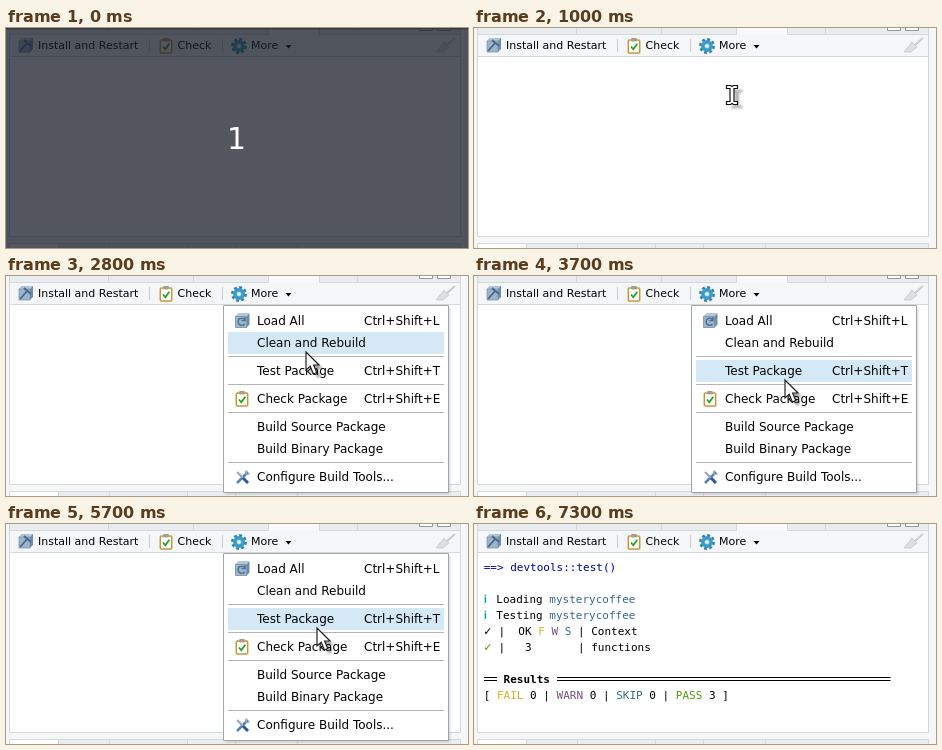
Recreate the animation shown at these times as an HTML page. Size 462x220 px, loop 8 s.

```html
<!DOCTYPE html>
<html lang="en">
<head>
<meta charset="utf-8">
<title>Build menu</title>
<style>
html, body { margin: 0; width: 100%; height: 100%; overflow: hidden; background: #f4f6f8; }
svg { display: block; width: 462px; height: 220px; }
text { white-space: pre; font: 11px "DejaVu Sans", sans-serif; }
#menu text { font-size: 12px; }
#output text { font-family: "DejaVu Sans Mono", monospace; }
#output .tick { font-family: "DejaVu Sans", sans-serif; }
#output .bold { font-weight: bold; }
#countdown text { font-size: 30px; fill: #fff; text-anchor: middle; }
.info { fill: #06989a; font-weight: bold; }
.pkg, .skip { fill: #37698f; }
.fail { fill: #e0b01c; }
.warn { fill: #75507b; }
.pass { fill: #4e9a06; }
</style>
</head>
<body>
<svg viewBox="0 0 462 220">
  <defs>
    <filter id="soft" x="-50%" y="-50%" width="200%" height="200%"><feGaussianBlur stdDeviation="1"/></filter>
    <g id="cube">
      <path d="M1 3 4 0H15V11L12 14H1Z" fill="#6f8ba8"/>
      <path d="M1 3 4 0H15L12 3Z" fill="#b4c6d8"/>
      <path d="M1 3H12V14H1Z" fill="#9db4ca" stroke="#7d97b1" stroke-width=".8"/>
    </g>
    <g id="clipboard">
      <rect x=".8" y="2" width="11.4" height="13" rx="1" fill="#fff" stroke="#c5973d" stroke-width="1.5"/>
      <rect x="3.5" y="0" width="6" height="3.5" rx="1" fill="#a9a08a"/>
      <path d="M3.5 8.5 5.8 11.3 9.8 5.8" fill="none" stroke="#23a32b" stroke-width="1.8"/>
    </g>
    <path id="arrowShape" d="M0 0V18L4.2 14.2 7.4 22 10.8 20.5 7.6 13H13Z"/>
    <path id="beamShape" d="M-5.5 -9.5H-1.5L0 -8.5 1.5 -9.5H5.5V-6.5H2V6.5H5.5V9.5H1.5L0 8.5 -1.5 9.5H-5.5V6.5H-2V-6.5H-5.5Z"/>
  </defs>

  <!-- Pane frame and neighbouring tabs -->
  <rect width="462" height="220" fill="#f4f6f8"/>
  <path d="M4 0H454V6H4Z" fill="#e9edf0"/>
  <path d="M263 0H313V7H263Z" fill="#f8f9fa"/>
  <path d="M4 6.5H263M313 6.5H454M102.5 0V6M187.5 0V6M262.5 0V6M313.5 0V6M351.5 0V6" stroke="#d3d8dc"/>
  <path d="M413.5 0V2.5H426.5V0M431.5 0V2.5H444.5V0" fill="#fff" stroke="#8e959c"/>
  <path d="M4 29H454V208H4Z" fill="#fff"/>
  <path d="M3.5 0V208.5H454.5V0M4 28.5H454" fill="none" stroke="#d3d8dc"/>
  <path d="M4 216H454V220H4Z" fill="#e9edf0"/>
  <path d="M4 216H52V220H4Z" fill="#fff"/>
  <path d="M3.5 220V215.5H454.5V220M52.5 216V220M103.5 216V220M181.5 216V220M229.5 216V220M291.5 216V220" fill="none" stroke="#d3d8dc"/>

  <!-- Toolbar -->
  <use href="#cube" x="12" y="10"/>
  <path d="M14 23 22 14M18 12 25 18" stroke="#46698c" stroke-width="1.8"/>
  <text x="32" y="21">Install and Restart</text>
  <use href="#clipboard" x="153.5" y="10"/>
  <text x="171.5" y="21">Check</text>
  <g transform="translate(233 18)" fill="none">
    <circle r="6.6" stroke="#2d82ac" stroke-width="2.6" stroke-dasharray="2.8 2.384"/>
    <circle r="4.2" fill="#8dcbe5" stroke="#3c9bc6" stroke-width="3.4"/>
    <circle r="1.7" fill="#e8f4fa"/>
  </g>
  <text x="245" y="21">More</text>
  <path d="M279.5 17H285.5L282.5 20.5Z"/>
  <path d="M143.5 11V24M216.5 11V24" stroke="#cdd1d5"/>
  <path d="M449 10 441 17" stroke="#c9cccf" stroke-width="2"/>
  <path d="M438 14 443 19 437 24 430 24Z" fill="#dcdee0" stroke="#c6c9cc" stroke-width=".8"/>
  <path id="stop" d="M413 10H419L423 14V20L419 24H413L409 20V14Z" fill="#d3352f"/>

  <!-- Build output -->
  <g id="output">
    <g data-from="6100"><text x="9.7" y="47" fill="#0000a0">==&gt; devtools::test()</text></g>
    <g data-from="6800"><text x="9.7" y="79"><tspan class="info">ℹ</tspan><tspan x="22.3">Loading <tspan class="pkg">mysterycoffee</tspan></tspan></text></g>
    <g data-from="6900"><text x="9.7" y="95"><tspan class="info">ℹ</tspan><tspan x="22.3">Testing <tspan class="pkg">mysterycoffee</tspan></tspan></text></g>
    <g data-from="7100">
      <text x="9.2" y="111" class="tick">✓</text>
      <text x="24.5" y="111">|  OK <tspan class="fail">F</tspan> <tspan class="warn">W</tspan> <tspan class="skip">S</tspan> | Context</text>
      <text x="9.2" y="127" class="tick pass">✓</text>
      <text x="24.5" y="127">|   3       | functions</text>
    </g>
    <g data-from="7300">
      <text x="29.6" y="159" class="bold">Results</text>
      <path d="M10 153.5H23M10 156.5H23M83 153.5H416.5M83 156.5H416.5" stroke="#000" stroke-width="1.2"/>
      <text x="9.7" y="175">[ <tspan class="fail">FAIL</tspan> 0 | <tspan class="warn">WARN</tspan> 0 | <tspan class="skip">SKIP</tspan> 0 | <tspan class="pass">PASS</tspan> 3 ]</text>
    </g>
  </g>

  <g id="menu">
    <path d="M219 31H444V218H219Z" opacity=".18" filter="url(#soft)"/>
    <path d="M217.5 29.5H442.5V216.5H217.5Z" fill="#fff" stroke="#a3a6a9"/>
    <rect id="highlight" x="222" width="216" height="22" fill="#d5e8f5"/>
    <path d="M222 80.5H438M222 108.5H438M222 136.5H438M222 186.5H438" stroke="#b4b4b4"/>
    <use href="#cube" x="228.5" y="37.5"/>
    <path d="M238.5 43.5A3.6 3.6 0 1 0 238.5 48M239 41V44.5H235.5" fill="none" stroke="#4e6f91" stroke-width="1.4"/>
    <use href="#clipboard" x="229.5" y="115"/>
    <path d="M231 207 242 196" stroke="#5b83b5" stroke-width="2.6"/>
    <path d="M231 196 237 202" stroke="#9aa5b1" stroke-width="2"/>
    <path d="M237 202 242 207" stroke="#2d55a5" stroke-width="3"/>
    <path d="M240 194.5V198H243.5" fill="none" stroke="#8ba5c2" stroke-width="1.6"/>
    <g id="items"></g>
  </g>

  <g id="arrow">
    <use href="#arrowShape" x="4" y="4" opacity=".35" filter="url(#soft)"/>
    <use href="#arrowShape" fill="#fff" stroke="#222" stroke-width="1.2"/>
  </g>
  <g id="beam">
    <use href="#beamShape" x="5" y="4" opacity=".3" filter="url(#soft)"/>
    <use href="#beamShape" fill="#fff" stroke="#111" stroke-width="1.2"/>
  </g>

  <g id="countdown">
    <rect width="462" height="220" fill="#1a1e28" opacity=".75"/>
    <path d="M0 .5H462" stroke="#30333a" stroke-width="2" opacity=".7"/>
    <text x="230.5" y="121">1</text>
  </g>
</svg>
<script>
const LOOP = 8000, STEP = 100;
const byId = id => document.getElementById(id);
const show = (el, on) => { el.style.display = on ? "" : "none"; };

// label, text baseline, shortcut key
const items = [
  ["Load All", 49, "L"], ["Clean and Rebuild", 71], ["Test Package", 99, "T"],
  ["Check Package", 127, "E"], ["Build Source Package", 155],
  ["Build Binary Package", 177], ["Configure Build Tools...", 205]
];
byId("items").innerHTML = items.map(([label, y, key]) =>
  `<text x="251" y="${y}">${label}</text>` +
  (key ? `<text x="358" y="${y}">Ctrl+Shift+${key}</text>` : "")).join("");

// time, x, y of the pointer's hot spot
const path = [
  [700, 123, 121], [800, 187, 95], [900, 231, 78], [1000, 258, 67], [1100, 270, 54],
  [1200, 268, 41], [1300, 263, 30], [1400, 258, 23], [1500, 255, 20],
  [2500, 255, 20], [2600, 264, 32], [2700, 283, 55], [2800, 300, 76], [2900, 310, 99], [3000, 315, 116],
  [3400, 315, 116], [3500, 314, 113], [3600, 312, 107], [3700, 311, 104], [LOOP, 311, 104]
];

function pointerAt(t) {
  const i = Math.max(1, path.findIndex(p => p[0] >= t));
  const [t0, x0, y0] = path[i - 1], [t1, x1, y1] = path[i];
  const k = Math.max(0, (t - t0) / (t1 - t0));
  return [x0 + (x1 - x0) * k, y0 + (y1 - y0) * k];
}

function render(now) {
  const t = Math.floor(now % LOOP / STEP) * STEP;
  const [x, y] = pointerAt(t);
  const menuOpen = t >= 2000 && t < 6100;
  const pointerVisible = t >= 700 && t < 6300;
  const isBeam = !menuOpen && y > 29;

  show(byId("countdown"), t < 100);
  show(byId("menu"), menuOpen);
  show(byId("stop"), t >= 6100 && t < 7300);
  show(byId("arrow"), pointerVisible && !isBeam);
  show(byId("beam"), pointerVisible && isBeam);
  for (const id of ["arrow", "beam"]) byId(id).setAttribute("transform", `translate(${x} ${y})`);

  // The first item stays selected until the pointer reaches another one.
  const selected = items.filter(item => item[1] - 15 <= y).pop() || items[0];
  byId("highlight").setAttribute("y", selected[1] - 15);

  for (const block of document.querySelectorAll("[data-from]")) show(block, t >= +block.dataset.from);
}

const start = performance.now();
function tick() {
  render(performance.now() - start);
  requestAnimationFrame(tick);
}
tick();
</script>
</body>
</html>
```
